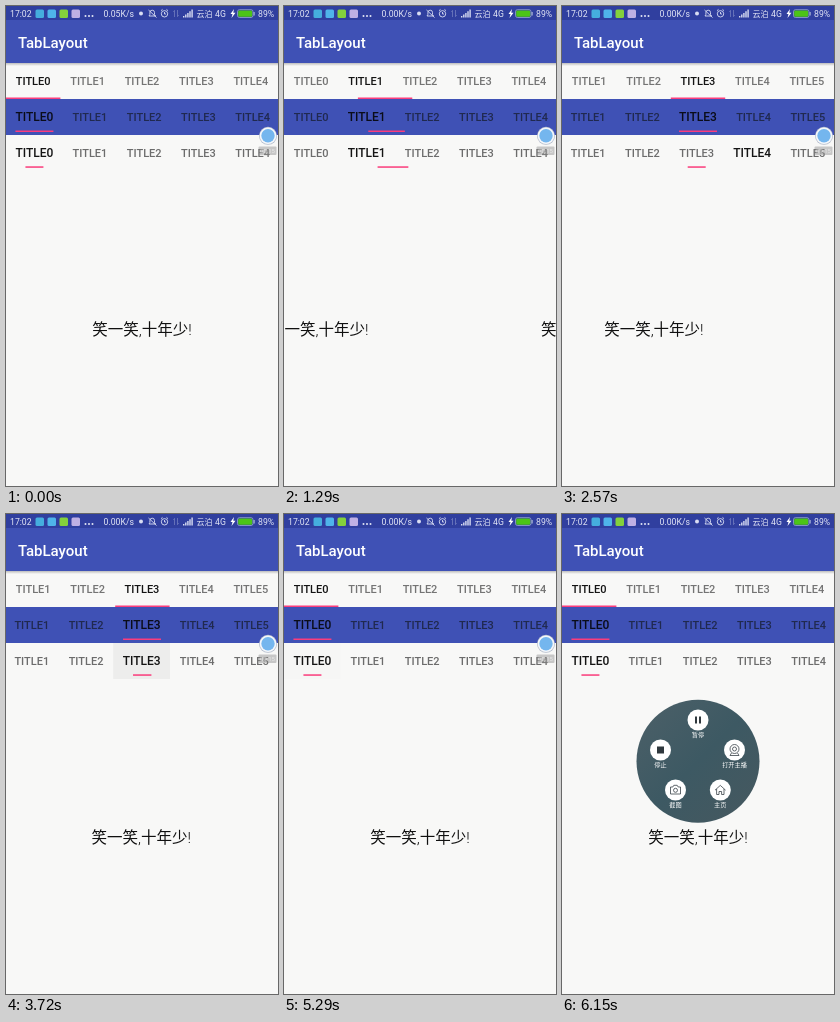
Write an HTML page that moves like this. It is 272x480 px and loops after 6.3 s.

```html
<!DOCTYPE html>
<html lang="zh">
<head>
<meta charset="utf-8">
<title>TabLayout</title>
<style>
html, body { margin: 0; width: 100%; height: 100%; overflow: hidden; background: #f8f8f7; }
svg { display: block; width: 100vw; height: 100vh; }
text { font-family: Roboto, "Noto Sans CJK SC", "Noto Sans CJK", sans-serif; }
.tab { font-weight: 500; text-anchor: middle; }
.page { font-size: 15.5px; font-weight: 300; text-anchor: middle; fill: #101010; }
.status text { font-size: 8.7px; fill: #e2e5f5; }
.menu text { font-size: 6.2px; text-anchor: middle; fill: #fff; }
.line { fill: none; stroke: #d9ddf2; stroke-width: .9; }
.icon { fill: none; stroke: #3b454b; stroke-width: .8; stroke-linejoin: round; }
</style>
</head>
<body>
<svg id="stage" viewBox="0 0 272 480">
  <defs>
    <linearGradient id="shade" x1="0" y1="0" x2="0" y2="1">
      <stop offset="0" stop-color="#000" stop-opacity=".24"/>
      <stop offset="1" stop-color="#000" stop-opacity="0"/>
    </linearGradient>
    <linearGradient id="disc" x1="0" y1="0" x2="1" y2="1">
      <stop offset="0" stop-color="#4c6068"/>
      <stop offset=".5" stop-color="#3d5963"/>
      <stop offset="1" stop-color="#46585f"/>
    </linearGradient>
  </defs>
  <rect width="272" height="480" fill="#f8f8f7"/>
  <g id="pages"></g>
  <rect y="93" width="272" height="36" fill="#3f51b5"/>
  <g id="rows"></g>
  <rect y="57" width="272" height="3" fill="url(#shade)"/>
  <rect width="272" height="57" fill="#3f51b5"/>
  <rect width="272" height="14" fill="#303f9f"/>
  <text x="12" y="42" font-size="15" font-weight="500" fill="#fff">TabLayout</text>

  <g class="status">
    <text x="4" y="10.7">17:02</text>
    <rect x="29.5" y="3.5" width="8.5" height="8.5" rx="1.5" fill="#45aede"/>
    <rect x="41.5" y="3.5" width="8.5" height="8.5" rx="1.5" fill="#4fb4ea"/>
    <rect x="53.5" y="3.5" width="8.5" height="8.5" rx="1.5" fill="#84d03c"/>
    <rect x="65.5" y="3.5" width="8.5" height="8.5" rx="1.5" fill="#bfb0e4"/>
    <g fill="#e2e5f5"><circle cx="79.5" cy="10" r="1"/><circle cx="83" cy="10" r="1"/><circle cx="86.5" cy="10" r="1"/></g>
    <text id="speed" x="97.5" y="10.7">0.05K/s</text>
    <circle cx="135" cy="7.5" r="2" fill="#d9ddf2"/>
    <path class="line" d="M143 10h6.5l-1-1.5V6.5a2.3 2.3 0 0 0-4.6 0V8.5zM142.5 4l8 7.5"/>
    <g class="line"><circle cx="158.5" cy="7.8" r="3.2"/><path d="M158.5 6v2h1.5M155 4.7l1.5-1.3M162 4.7l-1.5-1.3"/></g>
    <path class="line" opacity=".35" d="M168.5 11V4.5l-1.2 1.3M171.5 4v6.5l1.2-1.3"/>
    <path fill="#d9ddf2" d="M177 10h1.4v1.5H177zM179.1 8.5h1.4v3h-1.4zM181.2 7h1.4v4.500h-1.4zM183.300 5.300h1.400v6.200h-1.400zM185.400 3.500h1.400v8h-1.400z"/>
    <text x="190.5" y="10.7" style="font-size:8px">云泊</text>
    <text x="209" y="10.7">4G</text>
    <path fill="#fff" d="M228 3l-3.5 5h2l-1 4 4-5.300h-2.200z"/>
    <rect x="231.5" y="3.700" width="15.500" height="7.800" rx="2" fill="none" stroke="#a9b6d6" stroke-width=".7"/>
    <rect x="232.200" y="4.400" width="14" height="6.400" rx="1.300" fill="#4cc417"/>
    <rect x="247.500" y="6" width="1.200" height="3.500" fill="#a9b6d6"/>
    <text x="252" y="10.7">89%</text>
  </g>

  <g id="ball">
    <rect x="252.5" y="140.5" width="18" height="8.5" rx="1" fill="#8c8c8c" opacity=".45"/>
    <text x="261.5" y="147" font-size="6" text-anchor="middle" fill="#fff" opacity=".6">00:15</text>
    <circle cx="262" cy="129.8" r="9" fill="#b4bccb"/>
    <circle cx="262" cy="129.8" r="8.300" fill="#f4f7fb"/>
    <circle cx="262" cy="129.8" r="6.700" fill="#74b6ee"/>
  </g>

  <g id="menu" class="menu">
    <circle cx="136" cy="247.3" r="61.5" fill="url(#disc)"/>
    <g id="buttons"></g>
    <path d="M133 202.5h2v7h-2zM137 202.5h2v7h-2zM95 232.5h7v7h-7z" fill="#2f383d"/>
    <g class="icon">
      <circle cx="172.5" cy="235" r="4.5"/><circle cx="172.5" cy="235" r="2"/>
      <path d="M169.5 239l-1.5 2.5h9l-1.5-2.5"/>
      <path d="M108.5 273h2.3l1-1.7h3.4l1 1.7h2.3v7h-10z"/><circle cx="113.5" cy="276.3" r="2"/>
      <path d="M153 276.2l5.3-4.8 5.3 4.8M154.6 275v5.5h2.4v-3h2.6v3h2.4V275"/>
    </g>
  </g>
</svg>
<script>
const LOOP = 6300, W = 272, TABS = 6, LAG = 33, PINK = "#fb3d7c";
const $ = id => document.getElementById(id);

function add(parent, name, attrs, text) {
  const el = document.createElementNS("http://www.w3.org/2000/svg", name);
  for (const k in attrs) el.setAttribute(k, attrs[k]);
  if (text) el.textContent = text;
  parent.appendChild(el);
  return el;
}
const clamp = (v, lo, hi) => Math.min(hi, Math.max(lo, v));
const mix = (a, b, u) => a + (b - a) * u;
const linear = u => u;
const settle = u => 1 - (1 - u) ** 5;
const fling = u => 1 - (1 - u) ** 3;

// Pager moves: start, end, target page, easing
const taps = [[2555, 4], [3400, 3], [4080, 2], [4440, 1], [4760, 0]];
const moves = [
  [150, 430, .45, linear], [430, 880, 1, fling],
  [1010, 1250, 1.355, linear], [1250, 1310, 1.38, linear], [1310, 1720, 2, fling],
  [1740, 2007, 2.565, linear], [2007, 2440, 3, fling],
  ...taps.map(([t, tab]) => [t, t + 460, tab, settle])
];
const swipes = [[500, 1], [1370, 2], [2060, 3]];

function pageAt(t) {
  let p = 0;
  for (const [from, to, goal, ease] of moves) {
    if (t < from) break;
    p = mix(p, goal, ease(clamp((t - from) / (to - from), 0, 1)));
  }
  return p;
}
function selectedAt(t, delay) {
  let sel = 0;
  for (const [at, tab] of swipes) if (t >= at) sel = tab;
  for (const [at, tab] of taps) if (t >= at + delay) sel = tab;
  return sel;
}

// grow: extra width of the selected tab; bar: indicator style
const rows = [
  { base: 79.4, barY: 91.5, tabW: 54.4, grow: 0, size: 11, on: "#141414", off: "#747474", bar: "full", delay: 60 },
  { base: 115.4, barY: 124.5, tabW: 54.25, grow: 2.6, size: 12, on: "#0a0c18", off: "#20294f", bar: "text", delay: 60 },
  { base: 151.4, barY: 160.3, tabW: 54.25, grow: 2.6, size: 12, on: "#141414", off: "#6c6c6c", bar: "stretch", delay: 0 }
];
for (const row of rows) {
  row.g = add($("rows"), "g", {});
  if (row.bar === "stretch")
    row.ripples = taps.map(() => add(row.g, "rect", { y: 129, height: 36, fill: "#000" }));
  row.labels = Array.from({ length: TABS }, (_, i) =>
    add(row.g, "text", { class: "tab", y: row.base }, "TITLE" + i));
  row.line = add(row.g, "rect", { y: row.barY, height: 1.5, fill: PINK });
}
const pages = Array.from({ length: TABS }, () =>
  add($("pages"), "text", { class: "page", y: 328.7 }, "笑一笑,十年少!"));

for (const [x, y, label] of [[136, 206, "暂停"], [98.5, 236, "停止"], [172.5, 236, "打开主播"], [113.5, 276, "截图"], [158.3, 276, "主页"]]) {
  add($("buttons"), "circle", { cx: x, cy: y, r: 10.5, fill: "#fff" });
  add($("buttons"), "text", { x, y: y + 17.4 }, label);
}

function barEdges(row, tab, sel) {
  const mid = tab.x + tab.w / 2;
  const half = row.bar === "full" ? tab.w / 2 : row.bar === "text" ? (sel ? 19 : 17) : 9;
  return [mid - half, mid + half];
}

function drawRow(row, t, q) {
  const sel = selectedAt(t, row.delay);
  const tabs = row.labels.map((_, i) => ({
    x: i * row.tabW + (i > sel ? row.grow : 0),
    w: row.tabW + (i === sel ? row.grow : 0)
  }));
  const i = Math.min(Math.floor(q), TABS - 2), f = q - i;
  const total = TABS * row.tabW + row.grow;
  const scroll = clamp(q * row.tabW + (row.tabW + row.grow - W) / 2, 0, total - W);
  row.g.setAttribute("transform", `translate(${-scroll} 0)`);

  row.labels.forEach((el, n) => {
    el.setAttribute("x", tabs[n].x + tabs[n].w / 2);
    el.setAttribute("font-size", n === sel ? row.size : 11);
    el.setAttribute("fill", n === sel ? row.on : row.off);
  });

  const a = barEdges(row, tabs[i], i === sel), b = barEdges(row, tabs[i + 1], i + 1 === sel);
  const left = mix(a[0], b[0], f);
  const right = mix(a[1], b[1], row.bar === "stretch" ? 1 - (1 - f) ** 2 : f);
  row.line.setAttribute("x", left);
  row.line.setAttribute("width", right - left);

  if (row.ripples) row.ripples.forEach((el, n) => {
    const [at, tab] = taps[n], age = t - at;
    el.setAttribute("x", tabs[tab].x);
    el.setAttribute("width", tabs[tab].w);
    el.setAttribute("opacity", .045 * clamp(Math.min((age - 40) / 120, (560 - age) / 200), 0, 1));
  });
}

function draw(t) {
  const p = pageAt(t), q = pageAt(t - LAG);
  pages.forEach((el, i) => el.setAttribute("x", W / 2 + (i - p) * W));
  rows.forEach(row => drawRow(row, t, q));
  $("speed").textContent = t < 700 ? "0.05K/s" : "0.00K/s";
  $("ball").setAttribute("opacity", clamp((5710 - t) / 80, 0, 1));
  const open = fling(clamp((t - 5680) / 220, 0, 1));
  $("menu").setAttribute("opacity", open);
  $("menu").setAttribute("transform", `translate(136 247.3) scale(${mix(.3, 1, open)}) translate(-136 -247.3)`);
}

const start = performance.now();
function tick() {
  draw((performance.now() - start) % LOOP);
  requestAnimationFrame(tick);
}
tick();
</script>
</body>
</html>
```
